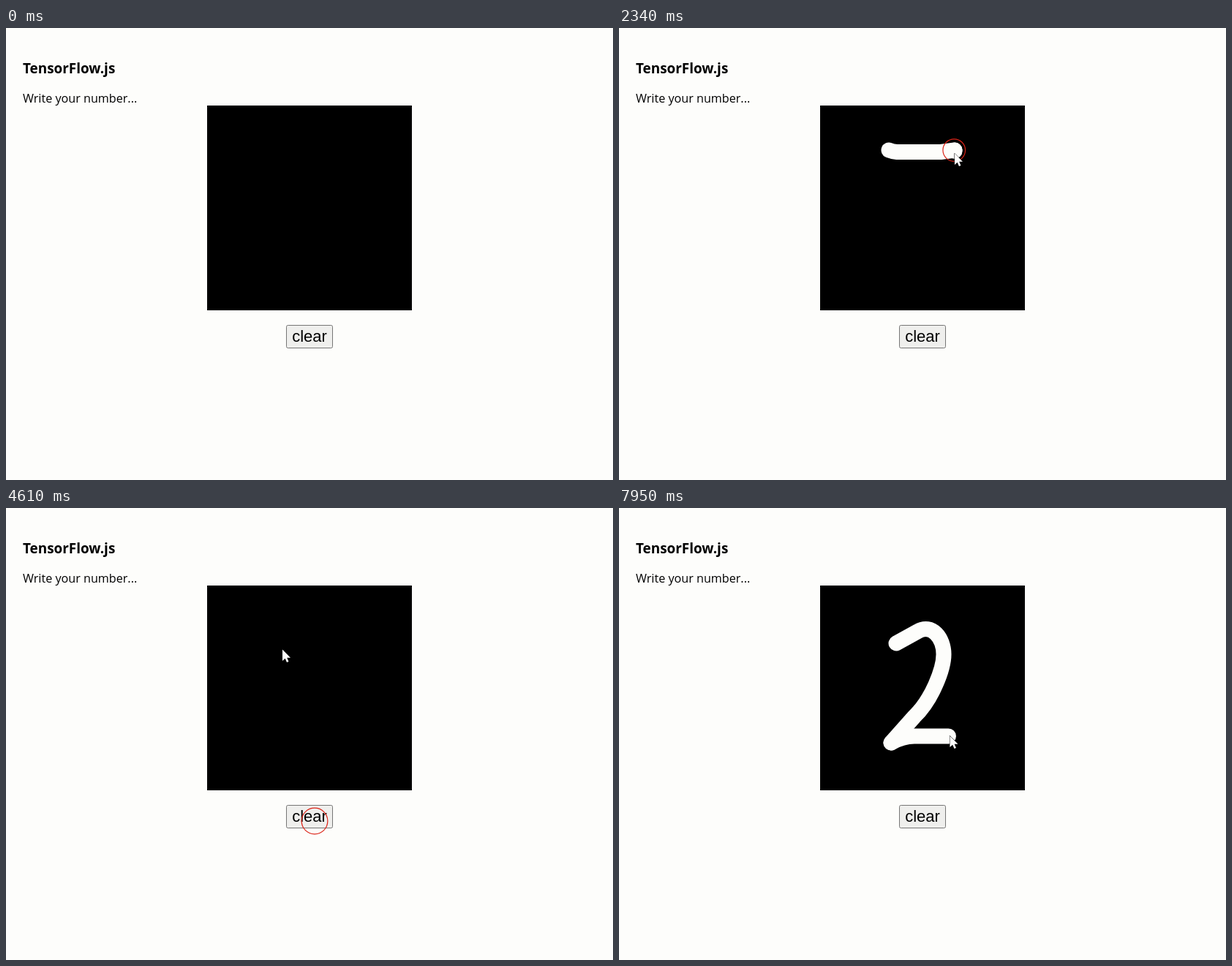
An HTML page for the animation above (7990 ms loop, 830x618 px).

```html
<!DOCTYPE html>
<html lang="en">
<head>
<meta charset="utf-8">
<title>Write your number</title>
<style>
  html, body { margin: 0; width: 100%; height: 100%; overflow: hidden; background: #fdfdfb; }
  svg { display: block; width: 830px; height: 618px; }
  .page { font-family: "Open Sans", "Noto Sans", sans-serif; font-size: 16.15px; }
  .title { font-size: 18.9px; font-weight: 700; }
  .label { font: 22px "Liberation Sans", Arial, sans-serif; text-anchor: middle; }
  #ink { fill: none; stroke: #fdfdfb; stroke-width: 21; stroke-linecap: round; stroke-linejoin: round; }
  #ring { fill: none; stroke: #dc2418; stroke-width: 1.2; }
  #cursor { fill: #fff; stroke: #000; stroke-width: 1; paint-order: stroke; }
</style>
</head>
<body>
<svg viewBox="0 0 830 618">
  <g class="page">
    <text class="title" x="23" y="62">TensorFlow.js</text>
    <text x="23" y="102">Write your number...</text>
  </g>
  <rect x="275" y="106" width="280" height="280"/>
  <rect x="383.5" y="406.5" width="63" height="31" rx="2" fill="#efefed" stroke="#767676"/>
  <text class="label" x="415" y="429">clear</text>
  <g id="ink"></g>
  <circle id="ring"/>
  <path id="cursor" d="M0 -.5V15L3.7 11.7L6 17L8.5 15.9L6.2 10.7H11Z"/>
</svg>
<script>
const LOOP = 7990, CLEAR = 4435;
const PEN_LAG = 22, PRESS_LEAD = 117, RING_TIME = 200;

const byId = id => document.getElementById(id);
const ink = byId("ink"), ring = byId("ring"), cursor = byId("cursor");
const show = (el, on) => el.style.visibility = on ? "visible" : "hidden";
const smooth = k => k * k * (3 - 2 * k);
const linear = k => k;

function stage(start, end, d, ease) {
  const path = document.createElementNS("http://www.w3.org/2000/svg", "path");
  path.setAttribute("d", d);
  const total = path.getTotalLength();
  const lengthAt = t => total * ease(Math.min(1, Math.max(0, (t - start) / (end - start))));
  return { start, path, lengthAt };
}

const move = (start, end, d) => stage(start, end, d, smooth);

function write(start, end, d) {
  const stroke = stage(start, end, d, linear);
  stroke.press = start - PRESS_LEAD;
  stroke.wipe = start < CLEAR ? CLEAR : LOOP;
  ink.append(stroke.path);
  return stroke;
}

const stages = [
  move(160, 940, "M404 414Q392 290 369 167"),
  write(1380, 2200, "M369 167Q374 169 380 169.5H440L459 167"),
  write(2310, 3290, "M459 167Q459 215 441 303L437 325"),
  move(3380, 4010, "M437 325L579 486"),
  move(4300, 4420, "M579 486L422 428"),
  move(4450, 4610, "M422 428L378 194"),
  move(4610, 4990, "M378 194L379 185"),
  write(5549, 6850, "M379 185L408 169C428 157 444 178 444 200C444 220 428 262 404 285L372 321"),
  write(7050, LOOP, "M372 321Q388 312 404 312H456")
];
const strokes = stages.filter(s => s.press);
const clicks = [CLEAR, ...strokes.map(s => s.press)];

function pointAt(t) {
  const current = stages.findLast(s => s.start <= t) || stages[0];
  return current.path.getPointAtLength(current.lengthAt(t));
}

function draw(t) {
  for (const s of strokes) {
    show(s.path, t >= s.press && t < s.wipe);
    s.path.style.strokeDasharray = `${Math.max(0.01, s.lengthAt(t - PEN_LAG))} 9999`;
  }

  const click = clicks.find(c => t >= c && t < c + RING_TIME);
  show(ring, click !== undefined);
  if (click !== undefined) {
    const { x, y } = pointAt(click);
    ring.setAttribute("cx", x);
    ring.setAttribute("cy", y);
    ring.setAttribute("r", 2 + 18 * (t - click) / RING_TIME);
  }

  const { x, y } = pointAt(t);
  show(cursor, t >= stages[0].start);
  cursor.setAttribute("transform", `translate(${x} ${y})`);
}

const start = performance.now();
function tick() {
  draw((performance.now() - start) % LOOP);
  requestAnimationFrame(tick);
}
tick();
</script>
</body>
</html>
```
